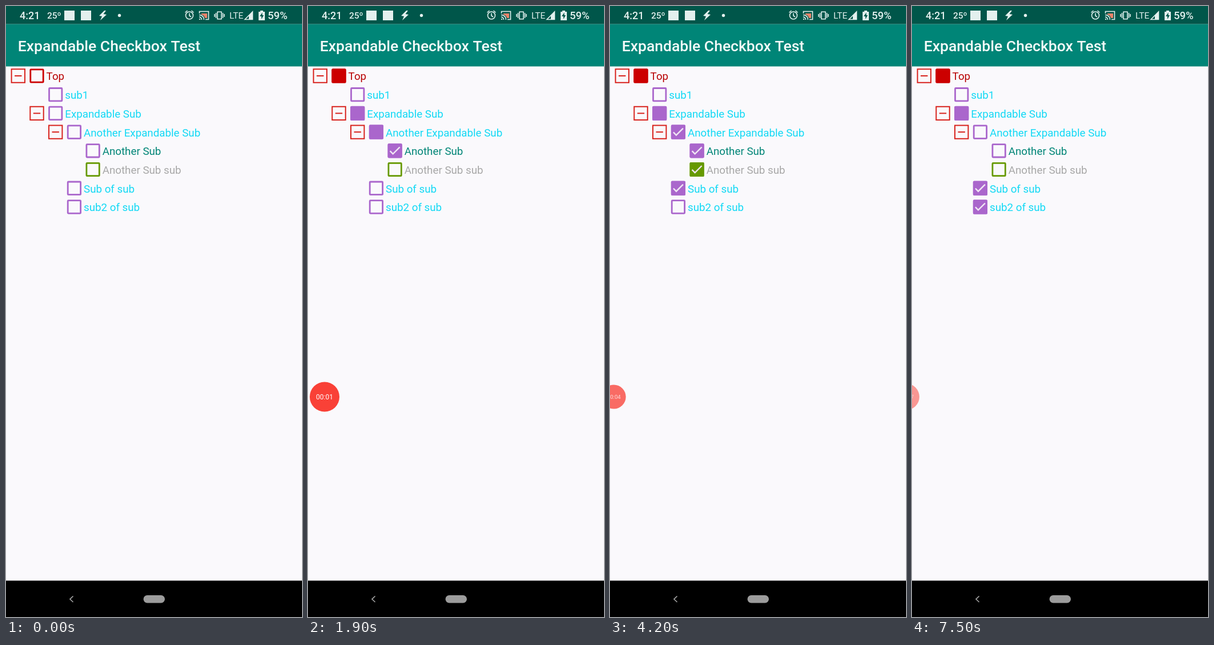
Write an HTML page with a canvas that moves like this. It is 518 px wide and 1067 px high and loops after 8000 ms.

```html
<!DOCTYPE html>
<html lang="en">
<head>
<meta charset="utf-8">
<title>Expandable Checkbox Test</title>
<style>
html, body { margin: 0; width: 100%; height: 100%; overflow: hidden; }
canvas { display: block; }
</style>
</head>
<body>
<canvas width="518" height="1067"></canvas>
<script>
const g = document.querySelector('canvas').getContext('2d');
const LOOP = 8000, STEP = 32.7;
const RED = '#cc0000', PURPLE = '#aa66cc', GREEN = '#669900', CYAN = '#12d9f5';
const PALE = '#e3f0ee';

// depth, label, text colour, box colour, expandable, [time, state] changes
// states: 0 empty, 1 partly selected, 2 checked
const rows = [
  [0, 'Top', '#b80000', RED, true, [[1100, 1]]],
  [1, 'sub1', CYAN, PURPLE, false, []],
  [1, 'Expandable Sub', CYAN, PURPLE, true, [[1100, 1], [4450, 2], [5900, 1]]],
  [2, 'Another Expandable Sub', CYAN, PURPLE, true, [[1100, 1], [1950, 2], [5900, 0]]],
  [3, 'Another Sub', '#008577', PURPLE, false, [[1100, 2], [5900, 0]]],
  [3, 'Another Sub sub', '#a8a8a8', GREEN, false, [[1950, 2], [5900, 0]]],
  [2, 'Sub of sub', CYAN, PURPLE, false, [[3500, 2]]],
  [2, 'sub2 of sub', CYAN, PURPLE, false, [[4450, 2]]]
];
const taps = [[1100, 4], [1950, 5], [3500, 6], [4450, 7], [5900, 3]]; // time, row

// recording bubble: time, centre x, radius, opacity
const bubble = [
  [200, 29, 26, 0], [350, 29, 26, 1], [2050, 29, 26, 1], [2350, 15.5, 21.5, .87],
  [3300, 11, 20, .8], [3600, 11, 20, .8], [4800, 2.5, 22, .74], [5500, -2, 22.5, .68],
  [5900, -2, 22.5, .68], [6400, -9, 23, .56], [7400, -10, 23, .53], [8000, -10.5, 23, .53]
];

const clamp = x => Math.max(0, Math.min(1, x));
const rowX = d => 54 + d * STEP;
const rowY = i => 122 + i * STEP;

function rect(x, y, w, h, color, r = 0) {
  g.fillStyle = color;
  g.beginPath();
  g.roundRect(x, y, w, h, r);
  g.fill();
}
function frame(x, y, half, line, color, r = 0) {
  g.strokeStyle = color;
  g.lineWidth = line;
  g.beginPath();
  g.roundRect(x - half, y - half, half * 2, half * 2, r);
  g.stroke();
}
function disc(x, y, r, color) {
  g.fillStyle = color;
  g.beginPath();
  g.arc(x, y, r, 0, 7);
  g.fill();
}
function line(d, color, width = 1.6) {
  g.strokeStyle = color;
  g.lineWidth = width;
  g.stroke(new Path2D(d));
}
function shape(d, color) {
  g.fillStyle = color;
  g.fill(new Path2D(d));
}
function text(s, x, y, size, color, weight = 400) {
  g.font = `${weight} ${size}px Roboto, sans-serif`;
  g.fillStyle = color;
  g.fillText(s, x, y);
}
function at(x, y, draw) {
  g.save();
  g.translate(x, y);
  draw();
  g.restore();
}

function statusBar() {
  rect(0, 0, 518, 31.5, '#00564a');
  text('4:21', 24, 22.7, 18, PALE, 500);
  text('25º', 72, 22, 15.5, PALE, 500);
  rect(102, 8, 18, 17, PALE);
  rect(131, 8, 18, 17, PALE);
  shape('M172 8L163 17L168 18L165 25L176 15L170.500 14L175 8Z', PALE);
  disc(198.5, 16.5, 2.7, PALE);
  line('M314.500 16.500a6.500 6.500 0 1 0 13 0a6.500 6.500 0 1 0 -13 0M321 12.500V17L324 19M313.500 11.500L317.500 8M328.500 11.500L324.500 8', PALE);
  shape('M342 13H352V21H348Q347 16 342 15Z', '#e8836a');
  line('M338.500 13V9.500H354.500V23.500H349M338 15.500Q346 16 346.500 24M338 19Q342 19.500 342.500 24', PALE);
  shape('M338 21.500Q340 22 340.500 24H338Z', PALE);
  line('M370 10.200H377V22.800H370ZM367.500 12V21M379.500 12V21M365 14V19M382 14V19', PALE);
  text('LTE', 391, 22, 15.5, PALE);
  line('M418 23.500L431.500 10V23.500Z', PALE);
  shape('M425 17L432 9.500V24H425Z', PALE);
  shape('M442 10H445V8H450V10H453V25H442Z', PALE);
  shape('M448.500 11.500L444 18H447V23L451 16H448.500Z', '#00564a');
  text('59%', 458, 23, 18.5, PALE, 500);
}

function chrome() {
  rect(0, 0, 518, 1067, '#faf9fc');
  rect(0, 31.5, 518, 74, '#008577');
  statusBar();
  text('Expandable Checkbox Test', 20.7, 79, 26.5, '#f4faf9', 500);
  rect(0, 1003.5, 518, 63.5, '#000');
  line('M117.500 1030.500L112 1035.800L117.500 1041', '#a0a0a0', 1.7);
  rect(240.5, 1029, 37.5, 13.5, '#9c9c9c', 6.7);
}

function checkbox(t, color, changes) {
  let fill = 0, check = 0;
  for (const [start, state] of changes) {
    const p = clamp((t - start) / 120);
    fill += ((state > 0) - fill) * p;
    check += ((state > 1) - check) * p;
  }
  frame(0, 0, 11.2, 2.8, color, 1);
  g.globalAlpha = fill;
  rect(-12.5, -12.5, 25, 25, color, 1.5);
  g.globalAlpha = check;
  line('M-8.500 .3L-3.500 5.500L8.500 -6.500', '#f0e6f4', 2.4);
  g.globalAlpha = 1;
}

function ripple(t, [start, i]) {
  const p = (t - start) / 100;
  if (p <= 0 || p > 4) return;
  const alpha = .14 * clamp((4 - p) / 1.5);
  disc(rowX(rows[i][0]) + 5 + 6 * clamp(1 - p / 2), rowY(i), 15 + 6 * clamp(p - 1), `rgba(0,0,0,${alpha})`);
}

function list(t) {
  rows.forEach(([depth, , , color, open, changes], i) => {
    at(rowX(depth), rowY(i), () => checkbox(t, color, changes));
    if (open) at(rowX(depth - 1), rowY(i), () => {
      frame(0, 0, 11.7, 2, '#d8221c');
      rect(-6.2, -1, 12.4, 2, '#d8221c');
    });
  });
  taps.forEach(tap => ripple(t, tap));
  rows.forEach(([depth, label, color], i) =>
    text(label, rowX(depth) + 16.6, rowY(i) + 7.4, 18.75, color));
}

function timer(t) {
  if (t < bubble[0][0]) return;
  const k = bubble.findIndex(b => b[0] > t), from = bubble[k - 1], to = bubble[k];
  const p = (t - from[0]) / (to[0] - from[0]);
  const [, x, r, alpha] = from.map((v, j) => v + (to[j] - v) * p);
  const sec = Math.floor((t - 200) / 1000);
  g.globalAlpha = alpha;
  disc(x, 682.5, r, '#f94137');
  g.textAlign = 'center';
  text('00:0' + sec, x, 682.5 + r * .18, r * .46, '#fff');
  g.textAlign = 'left';
  g.globalAlpha = 1;
}

function draw(now) {
  const t = now % LOOP;
  chrome();
  list(t);
  timer(t);
  requestAnimationFrame(draw);
}
requestAnimationFrame(draw);
</script>
</body>
</html>
```
